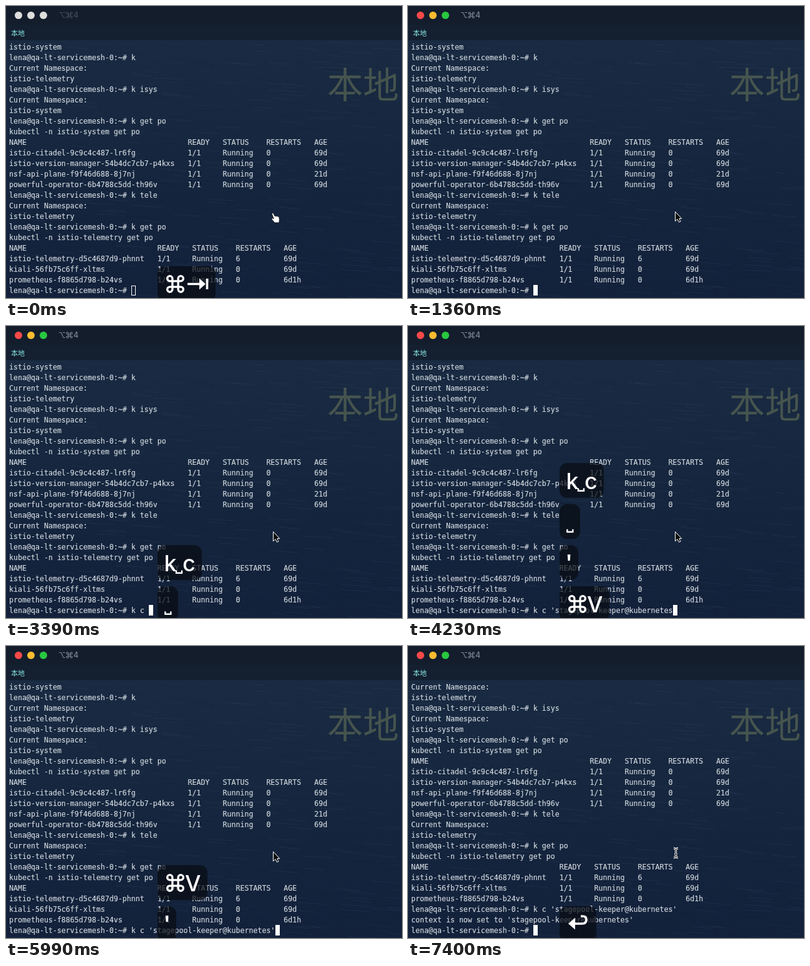
An HTML page for the animation above (8000 ms loop, 635 px wide and 469 px high).

```html
<!DOCTYPE html>
<html lang="en">
<head>
<meta charset="utf-8">
<title>Terminal</title>
<style>
  html, body { margin: 0; width: 100%; height: 100%; overflow: hidden; background: #14213a; }
  svg { display: block; width: 635px; height: 469px; }
  .row { font: 11.627px "DejaVu Sans Mono", monospace; white-space: pre; fill: #d2d9df; stroke: #d2d9df; stroke-width: .15px; }
  .cjk { font-family: "Noto Sans CJK SC", "Noto Sans CJK", sans-serif; }
  .cap { font: 500 36px Inter, sans-serif; fill: #fff; }
  .line { fill: none; stroke: #fff; stroke-width: 3.6; }
  .title { font: 500 12.5px Inter, sans-serif; }
</style>
</head>
<body>
<svg viewBox="0 0 635 469">
  <defs>
    <linearGradient id="sea" x1="0" y1="0" x2="0" y2="1">
      <stop offset="0" stop-color="#1a2c43"/>
      <stop offset=".45" stop-color="#16273f"/>
      <stop offset="1" stop-color="#13213b"/>
    </linearGradient>
    <path id="cmd" d="M9 9V4.5A4.5 4.5 0 1 0 4.5 9H23.5A4.5 4.5 0 1 0 19 4.5V23.5A4.5 4.5 0 1 0 23.5 19H4.5A4.5 4.5 0 1 0 9 23.5V9"/>
  </defs>
  <rect width="635" height="469" fill="url(#sea)"/>
  <g id="waves" fill="none"></g>
  <rect width="635" height="55" fill="#141f2f"/>
  <rect width="635" height="30" fill="#131d2c"/>
  <g id="lights">
    <circle cx="20" cy="15" r="6"/><circle cx="40" cy="15" r="6"/><circle cx="60" cy="15" r="6"/>
  </g>
  <g id="title" class="title">
    <path d="M85 10.5H88.3L92 18.5H95M90.8 10.5H95" fill="none" stroke="currentColor" stroke-width="1.2"/>
    <use href="#cmd" transform="translate(97 10) scale(.33)" fill="none" stroke="currentColor" stroke-width="3.6"/>
    <text x="108" y="19" fill="currentColor">4</text>
  </g>
  <text class="cjk" x="8" y="48" font-size="11" fill="#86e6e2">本地</text>
  <text class="cjk" x="515" y="148" font-size="57.5" font-weight="500" fill="#46544e">本地</text>
  <g id="rows"></g>
  <rect id="caret" fill="#fff" stroke="#fff"/>
  <g id="keys"></g>
  <g id="pointers" stroke-linejoin="round">
    <path d="M426.2 333.2q1.6-1.4 2.8.4l2.2 4.2q1.4-1.2 2.4 0 1.4-.8 2.2.4 1.6-.4 2 1l.6 4-.6 4.8h-7l-4.6-5.4q-.8-1.8 1.2-1.8l2 1.2z" fill="#fff" stroke="#111" stroke-width=".8"/>
    <path d="M428.5 330.3V345.6L432 342.4L434.4 347.2L437 346.1L434.8 341.4H438.8Z" fill="#0b0b0b" stroke="#fff"/>
    <g fill="none">
      <path id="beam" d="M426 325q3 0 3.5 2q.5-2 3.5-2M426 340q3 0 3.5-2q.5 2 3.5 2M429.5 327V338M427.5 334.5h4" stroke="#fff" stroke-width="2.8"/>
      <use href="#beam"/>
      <path d="M426 325q3 0 3.5 2q.5-2 3.5-2M426 340q3 0 3.5-2q.5 2 3.5 2M429.5 327V338M427.5 334.5h4" stroke="#111" stroke-width="1"/>
    </g>
  </g>
</svg>
<script>
const LOOP = 8000, CHAR = 7, LEFT = 5, TOP = 57, ROW = 17, VISIBLE = 24;
const $ = id => document.getElementById(id);
const make = (name, parent, attrs = {}) => {
  const node = document.createElementNS('http://www.w3.org/2000/svg', name);
  for (const key in attrs) node.setAttribute(key, attrs[key]);
  return parent.appendChild(node);
};

// Terminal contents
const prompt = 'lena@qa-lt-servicemesh-0:~# ';
const context = 'stagepool-keeper@kubernetes';
const switchTo = ns => ['Current Namespace:', ns];
const table = (width, pods) => [['NAME', 'READY', 'STATUS', 'RESTARTS', 'AGE'],
  ...pods.map(([name, restarts, age]) => [name, '1/1', 'Running', restarts, age])]
  .map(cells => cells.map((cell, i) => cell.padEnd([width, 8, 10, 11, 0][i])).join(''));

const history = [
  'istio-system',
  prompt + 'k', ...switchTo('istio-telemetry'),
  prompt + 'k isys', ...switchTo('istio-system'),
  prompt + 'k get po',
  'kubectl -n istio-system get po',
  ...table(41, [
    ['istio-citadel-9c9c4c487-lr6fg', '0', '69d'],
    ['istio-version-manager-54b4dc7cb7-p4kxs', '0', '69d'],
    ['nsf-api-plane-f9f46d688-8j7nj', '0', '21d'],
    ['powerful-operator-6b4788c5dd-th96v', '0', '69d']]),
  prompt + 'k tele', ...switchTo('istio-telemetry'),
  prompt + 'k get po',
  'kubectl -n istio-telemetry get po',
  ...table(34, [
    ['istio-telemetry-d5c4687d9-phnnt', '6', '69d'],
    ['kiali-56fb75c6ff-xltms', '0', '69d'],
    ['prometheus-f8865d798-b24vs', '0', '6d1h']])
];
const command = `k c '${context}'`;
const ENTER = 7400;
const typing = [[0, 0], [2800, 1], [2860, 2], [3030, 3], [3390, 4], [3870, 5],
  [4230, command.length - 1], [4950, command.length], [ENTER, 0]];
const output = [prompt + command, `context is now set to '${context}'`];

// Keystroke captions: each new one pushes the earlier ones up
const cmd = '<use href="#cmd" class="line" transform="translate(15.6 15.6) scale(.92)"/>';
const letter = (x, char) => `<text class="cap" x="${x}" y="42">${char}</text>`;
const space = x => `<path class="line" style="stroke-width:2.4" d="M${x} 40.5v4.3h9v-4.3"/>`;
const quote = '<path fill="#fff" d="M12.8 15h4.6l-.7 10h-3.2z"/>';
const k = letter(10.5, 'k');
const captions = [
  { at: 0, out: 1190, looks: [[0, 93, cmd +
    '<path class="line" d="M48 28.5H72M79.5 20V37"/><path fill="#fff" d="M67 19.5L77 28.5L67 37.5Z"/>']] },
  { at: 2800, out: 5010, looks: [[2800, 41, k], [2860, 52, k + space(30)],
    [3030, 71, k + space(30) + letter(40, 'c')]] },
  { at: 3390, out: 5410, looks: [[3390, 33, space(12.3)]] },
  { at: 3810, out: 5820, looks: [[3810, 30, quote]] },
  { at: 4170, out: 6160, looks: [[4170, 80, cmd + letter(44, 'V')]] },
  { at: 4890, out: 6870, looks: [[4890, 30, quote]] },
  { at: ENTER, out: 9999, looks: [[ENTER, 59,
    '<path class="line" d="M20 28H36Q43 28 43 21.5Q43 16 37 16H34"/><path fill="#fff" d="M25 18.5L14 28L25 37.5Z"/>']] }
];

const latest = (steps, t) => steps.filter(step => step[0] <= t).pop();

// Faint ripples on the backdrop
let seed = 7;
const random = () => (seed = seed * 16807 % 2147483647) / 2147483647;
for (let i = 0; i < 420; i++) {
  const x = random() * 635, y = 58 + random() * 411, w = 12 + random() * 40;
  make('path', $('waves'), {
    d: `M${x} ${y}q${w / 2} ${random() * 4 - 1} ${w} ${2 + random() * 2}`,
    stroke: i % 2 ? '#6d8bab' : '#050d1c', 'stroke-opacity': .09
  });
}

const rows = Array.from({ length: VISIBLE }, (_, i) =>
  make('text', $('rows'), { class: 'row', x: LEFT, y: TOP + 13 + i * ROW }));
for (const caption of captions) {
  caption.node = make('g', $('keys'));
  caption.box = make('rect', caption.node, { height: 56, rx: 12, fill: '#080c12', 'fill-opacity': .7 });
  caption.art = make('g', caption.node);
}

function drawTerminal(t, active) {
  const typed = command.slice(0, latest(typing, t)[1]);
  const lines = [...history, ...(t < ENTER ? [] : output), prompt + typed].slice(-VISIBLE);
  rows.forEach((row, i) => { if (row.textContent !== lines[i]) row.textContent = lines[i]; });
  const inset = active ? 0 : .5;
  const box = {
    x: LEFT + (prompt + typed).length * CHAR + inset,
    y: TOP + (VISIBLE - 1) * ROW + inset * 3,
    width: 7 - inset * 2, height: active ? 17 : 15,
    'fill-opacity': active ? 1 : 0, 'stroke-opacity': active ? 0 : 1
  };
  for (const key in box) $('caret').setAttribute(key, box[key]);
}

function drawCaptions(t) {
  for (const c of captions) {
    const fade = t < c.out ? 1 : Math.max(0, .75 - .25 * Math.floor((t - c.out) / 56));
    c.node.setAttribute('opacity', t < c.at ? 0 : fade);
    if (t < c.at) continue;
    const above = captions.filter(o => o.at > c.at && o.at <= t).length;
    c.node.setAttribute('transform', `translate(243 ${418 - 66 * above})`);
    const look = latest(c.looks, t);
    if (c.look !== look) {
      c.look = look;
      c.box.setAttribute('width', look[1]);
      c.art.innerHTML = look[2];
    }
  }
}

function draw(t) {
  const active = t >= 110;
  [...$('lights').children].forEach((light, i) =>
    light.setAttribute('fill', active ? ['#fc4a47', '#fcbc2f', '#28c840'][i] : '#dededd'));
  $('title').style.color = active ? '#7d868f' : '#434c58';
  drawTerminal(t, active);
  drawCaptions(t);
  const pointer = t < 290 ? 0 : t < ENTER ? 1 : 2;
  [...$('pointers').children].forEach((node, i) =>
    node.setAttribute('visibility', i === pointer ? 'visible' : 'hidden'));
}

const start = performance.now();
function tick(now) {
  draw(Math.max(0, now - start) % LOOP);
  requestAnimationFrame(tick);
}
draw(0);
requestAnimationFrame(tick);
</script>
</body>
</html>
```
